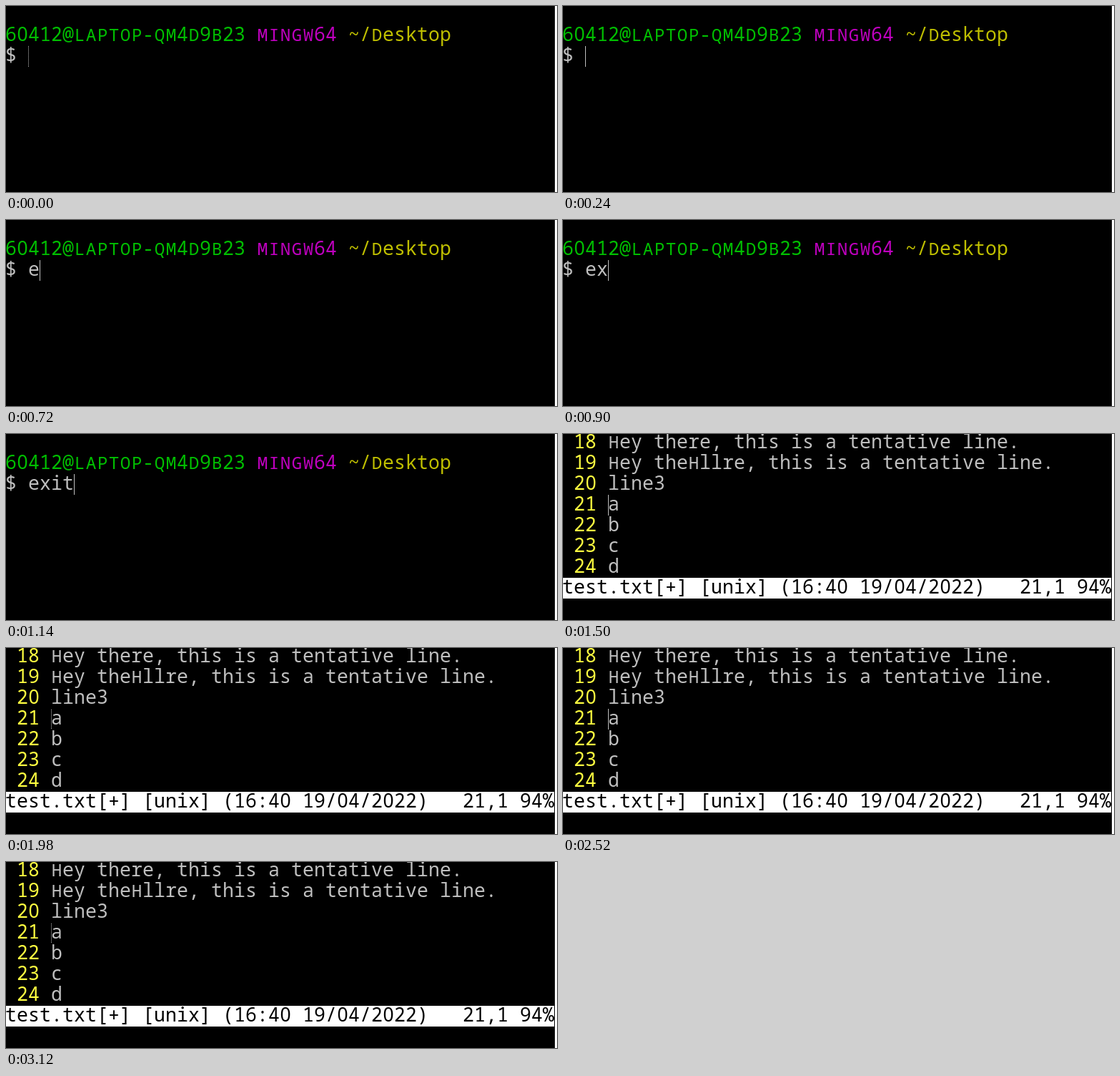
These frames come from a looping animation (771 by 260 pixels, 3.18 s). An HTML page:

```html
<!DOCTYPE html>
<html lang="en">
<head>
<meta charset="utf-8">
<title>Terminal session</title>
<style>
  html, body { margin: 0; width: 100%; height: 100%; overflow: hidden; background: #000; }
  svg { display: block; width: 771px; height: 260px; }
  text { font: 26.5px "Noto Sans Mono", "DejaVu Sans Mono", monospace; text-anchor: middle; }
  .cap { font-size: 24.3px; }
  .zero { font-family: "Noto Sans", sans-serif; }
</style>
</head>
<body>
<svg viewBox="0 0 771 260">
  <rect width="771" height="260" fill="#000"/>
  <rect x="768" width="3" height="260" fill="#fff"/>
  <g id="shell"></g>
  <g id="editor"></g>
  <path id="cursor" stroke="#bfbfbf" stroke-width="1" fill="none" shape-rendering="crispEdges"/>
</svg>
<script>
const NS = "http://www.w3.org/2000/svg";
const LOOP = 3180, CELL = 16, ROW = 29;
const FG = "#bfbfbf", GREEN = "#00bf00", PURPLE = "#bf00bf", OLIVE = "#bfbf00", NUMBER = "#ffff40";
const byId = id => document.getElementById(id);
const colX = col => col * CELL - 1;
const rowY = row => row * ROW - 2;
const shellView = byId("shell"), editorView = byId("editor"), caret = byId("cursor");

function add(parent, tag, attrs) {
  const el = parent.appendChild(document.createElementNS(NS, tag));
  for (const key in attrs) el.setAttribute(key, attrs[key]);
  return el;
}

// One glyph per terminal cell, centred in it.
function addText(parent, row, col, str, fill) {
  const line = add(parent, "text", { y: rowY(row) + 22, fill });
  for (const run of str.matchAll(/[A-Z]+|0|[^A-Z0\s]+/g)) {
    const xs = [...run[0]].map((_, i) => colX(col + run.index + i) + CELL / 2);
    const kind = /[A-Z]/.test(run[0]) ? "cap" : run[0] === "0" ? "zero" : "plain";
    add(line, "tspan", { x: xs.join(" "), class: kind }).textContent = run[0];
  }
  return line;
}

addText(shellView, 1, 0, "60412@LAPTOP-QM4D9B23", GREEN);
addText(shellView, 1, 22, "MINGW64", PURPLE);
addText(shellView, 1, 30, "~/Desktop", OLIVE);
addText(shellView, 2, 0, "$", FG);
const typed = [..."exit"].map((ch, i) => addText(shellView, 2, 2 + i, ch, FG));
const echo = addText(shellView, 3, 0, "exit", FG);

["Hey there, this is a tentative line.", "Hey theHllre, this is a tentative line.",
  "line3", "a", "b", "c", "d"].forEach((str, i) => {
  addText(editorView, i, 1, String(18 + i), NUMBER);
  addText(editorView, i, 4, str, FG);
});
add(editorView, "rect", { y: rowY(7), width: 767, height: ROW, fill: "#fff" });
addText(editorView, 7, 0, "test.txt[+] [unix] (16:40 19/04/2022)   21,1 94%", "#000");

const KEYS = [720, 900, 1020, 1140];
const ENTER = 1440, OPEN = 1500;
const show = (el, on) => el.setAttribute("display", on ? "inline" : "none");

// The resting phase of the blink lights even pixel rows only.
function drawCaret(col, row, solid) {
  const x = colX(col) + 0.5, y = rowY(row);
  const start = solid ? y : y + y % 2;
  caret.setAttribute("d", `M${x} ${start}V${y + ROW}`);
  caret.setAttribute("stroke-dasharray", solid ? "none" : "1 1");
}

function render(t) {
  const inEditor = t >= OPEN;
  const count = KEYS.filter(k => t >= k).length;
  show(shellView, !inEditor);
  show(editorView, inEditor);
  typed.forEach((el, i) => show(el, i < count));
  show(echo, t >= ENTER);
  show(caret, t < ENTER || inEditor);
  if (inEditor) drawCaret(4, 3, t < 1980 || (t >= 2520 && t < 3000));
  else drawCaret(2 + count, 2, t >= 240);
}

const begin = performance.now();
function tick() {
  render((performance.now() - begin) % LOOP);
  requestAnimationFrame(tick);
}
render(0);
requestAnimationFrame(tick);
</script>
</body>
</html>
```
